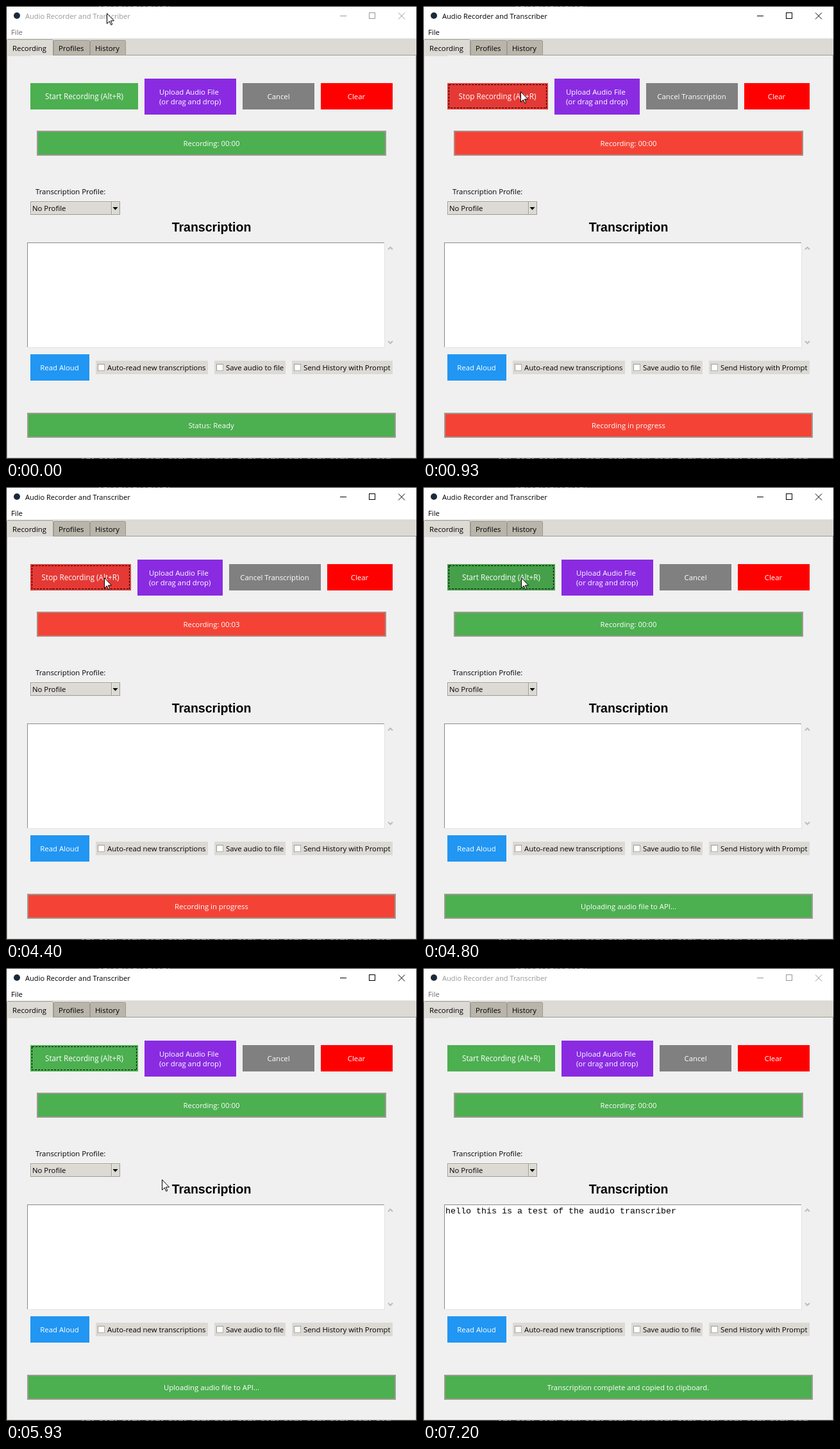
An HTML page that plays this animation: 641x705 px, repeating every 7.27 s.

```html
<!DOCTYPE html>
<html lang="en">
<head>
<meta charset="utf-8">
<title>Audio Recorder and Transcriber</title>
<style>
  html, body { margin: 0; width: 100%; height: 100%; overflow: hidden; background: #222; }
  svg { display: block; width: 641px; height: 705px; }
  rect, .crisp { shape-rendering: crispEdges; }
  text { font: 11.35px "Open Sans", "Noto Sans", sans-serif; }
  .title { font-size: 11.1px; }
  .wide { font-size: 11.7px; }
  .mid { text-anchor: middle; }
  .light text { fill: #fff; }
  .heading { font: bold 19.55px "Liberation Sans", Arial, sans-serif; }
  .mono { font: 13.333px "Liberation Mono", monospace; }

  .green { fill: #4caf50; }
  .red { fill: #f44336; }
  .violet { fill: #8a2be2; }
  .gray { fill: #808080; }
  .face { fill: #dcdad5; }
  .edge { fill: none; stroke: #9e9a91; }
  .ring { fill: none; stroke: #000; stroke-dasharray: 3 2; }
  .arrow { fill: none; stroke: #bcbcbc; stroke-width: 2; }

  /* One shared clock, hard changes */
  .a { animation: 7270ms step-end infinite; }
  .bar { animation-name: bar; }
  .menu { animation-name: menu; }
  .idle { animation-name: idle; }
  .rec { animation-name: rec; }
  .hover { animation-name: hover; }
  .focus { animation-name: focus; }
  .ready { animation-name: ready; }
  .upload { animation-name: upload; }
  .done { animation-name: done; }
  .s0 { animation-name: s0; }
  .s1 { animation-name: s1; }
  .s2 { animation-name: s2; }
  .s3 { animation-name: s3; }
  .cursor { animation-name: cursor; }

  @keyframes bar { 0%, 99.02% { color: #999; } 11% { color: #000; } }
  @keyframes menu { 0%, 99.02% { fill: #6d6d6d; } 11% { fill: #000; } }
  @keyframes idle { 0%, 66.01% { opacity: 1; } 12.78% { opacity: 0; } }
  @keyframes rec { 0%, 66.01% { opacity: 0; } 12.78% { opacity: 1; } }
  @keyframes hover { 0%, 12.78%, 67.8% { opacity: 0; } 11%, 66.01% { opacity: 1; } }
  @keyframes focus { 0%, 99.02% { opacity: 0; } 11% { opacity: 1; } }
  @keyframes ready { 0% { opacity: 1; } 12.78% { opacity: 0; } }
  @keyframes upload { 0%, 85.27% { opacity: 0; } 66.01% { opacity: 1; } }
  @keyframes done { 0% { opacity: 0; } 85.27% { opacity: 1; } }
  @keyframes s0 { 0% { opacity: 1; } 26.54% { opacity: 0; } }
  @keyframes s1 { 0%, 40.29% { opacity: 0; } 26.54% { opacity: 1; } }
  @keyframes s2 { 0%, 54.05% { opacity: 0; } 40.29% { opacity: 1; } }
  @keyframes s3 { 0% { opacity: 0; } 54.05% { opacity: 1; } }

  @keyframes cursor {
    /* title bar to the record button */
    0% { transform: translate(157px, 11px); opacity: 1; }
    .95% { transform: translate(122px, 27px); }
    1.78% { transform: translate(77px, 52px); }
    2.74% { transform: translate(62px, 85px); }
    3.7% { transform: translate(95px, 118px); }
    4.52% { transform: translate(150px, 128px); }
    5.49% { transform: translate(183px, 132px); }
    6.45% { transform: translate(152px, 133px); }
    /* small drifts on the button */
    16.49% { transform: translate(150px, 135px); }
    17.45% { transform: translate(148px, 137px); }
    57.76% { transform: translate(149px, 138px); }
    58.72% { transform: translate(151px, 140px); }
    59.54% { transform: translate(152px, 141px); }
    60.5% { transform: translate(153px, 141px); }
    /* away to the right, then back left */
    66.97% { transform: translate(160px, 148px); }
    67.8% { transform: translate(178px, 165px); }
    68.76% { transform: translate(205px, 195px); }
    69.72% { transform: translate(245px, 235px); }
    70.55% { transform: translate(290px, 272px); }
    71.51% { transform: translate(335px, 303px); }
    72.47% { transform: translate(375px, 324px); }
    73.3% { transform: translate(400px, 334px); }
    74.26% { transform: translate(412px, 338px); }
    75.23% { transform: translate(417px, 339px); }
    76.05% { transform: translate(408px, 336px); }
    77.02% { transform: translate(384px, 330px); }
    77.98% { transform: translate(345px, 325px); }
    78.8% { transform: translate(305px, 324px); }
    79.77% { transform: translate(270px, 326px); }
    80.73% { transform: translate(250px, 328px); }
    81.55% { transform: translate(243px, 329px); }
    /* out through the bottom */
    88.98% { transform: translate(236px, 355px); }
    89.81% { transform: translate(224px, 420px); }
    90.77% { transform: translate(235px, 500px); }
    91.73% { transform: translate(265px, 590px); }
    92.56% { transform: translate(310px, 675px); opacity: 1; }
    93.52%, 100% { transform: translate(310px, 705px); opacity: 0; }
  }
</style>
</head>
<body>
<svg viewBox="0 0 641 705">
  <defs>
    <g id="check">
      <rect width="11" height="11" fill="#fff"/>
      <rect x=".5" y=".5" width="10" height="10" fill="none" stroke="#b5b1a9"/>
      <path class="crisp edge" d="M.5 11V.5H11"/>
    </g>
    <path id="chevron" class="arrow" d="M-3.5 2L0-1.5 3.5 2"/>
  </defs>

  <!-- Desktop edge and window -->
  <rect width="641" height="705" fill="#222"/>
  <path class="crisp" d="M145 .5H260" stroke="#4c6672" stroke-dasharray="3 4 6 3 2 5"/>
  <path class="crisp" d="M118 704.5H600" stroke="#777" stroke-dasharray="4 3 7 2 3 9 5 3"/>
  <rect x="1" y="1" width="639" height="703" fill="#fff"/>

  <!-- Title bar and menu -->
  <circle cx="17" cy="15" r="5" fill="#1b2a3a"/>
  <g class="a bar" fill="none" stroke="currentColor">
    <text class="title" x="30" y="20" fill="currentColor" stroke="none">Audio Recorder and Transcriber</text>
    <path class="crisp" d="M521 15.5H531M566.5 10.5H575.5V19.5H566.5Z"/>
    <path d="M612 10.5L622 20.5M622 10.5L612 20.5"/>
  </g>
  <text class="a menu" x="8" y="45">File</text>

  <!-- Notebook -->
  <rect class="face" x="1" y="50" width="639" height="27"/>
  <path class="crisp" d="M1 50.5H640" stroke="#eeebe7"/>
  <rect x="1" y="77" width="639" height="627" fill="#f0f0f0"/>
  <rect class="edge" x="1.5" y="76.5" width="638" height="627"/>
  <g class="crisp" stroke="#9e9a91" fill="#bab5ab">
    <path d="M74.5 76.5V54.5L75.5 53.5H129.5L130.5 54.5V76.5Z"/>
    <path d="M131.5 76.5V54.5L132.5 53.5H185.5L186.5 54.5V76.5Z"/>
    <path d="M1.5 78V53.5L2.5 52.5H72.5L73.5 53.5V77" fill="#dcdad5"/>
  </g>
  <path class="crisp" d="M2.5 77V53.5H72" stroke="#eeebe7" fill="none"/>
  <text x="10" y="70">Recording</text>
  <text x="82" y="70">Profiles</text>
  <text x="139" y="70">History</text>

  <!-- Idle controls -->
  <g class="a idle light">
    <rect class="green" x="38" y="120" width="168" height="41"/>
    <rect class="a hover" x="38" y="120" width="168" height="41" fill="#45a049"/>
    <rect class="a focus ring" x="40.5" y="122.5" width="163" height="36"/>
    <text class="wide mid" x="122" y="145">Start Recording (Alt+R)</text>
    <rect class="violet" x="216" y="113" width="143" height="56"/>
    <text x="239" y="138">Upload Audio File</text>
    <text x="239" y="153">(or drag and drop)</text>
    <rect class="gray" x="369" y="120" width="112" height="41"/>
    <text class="mid" x="425" y="145">Cancel</text>
    <rect x="491" y="120" width="112" height="41" fill="#f00"/>
    <text class="mid" x="546.5" y="145">Clear</text>
    <rect class="green" x="48" y="194" width="545" height="39"/>
    <rect class="edge" x="49" y="195" width="543" height="37" stroke-width="2"/>
    <text class="mid" x="320.5" y="218">Recording: 00:00</text>
    <rect class="green" x="33" y="633" width="575" height="39"/>
  </g>

  <!-- Recording controls -->
  <g class="a rec light">
    <rect x="38" y="120" width="157" height="41" fill="#e53935"/>
    <rect class="ring" x="40.5" y="122.5" width="152" height="36"/>
    <text class="wide mid" x="116" y="145">Stop Recording (Alt+R)</text>
    <rect class="violet" x="205" y="113" width="133" height="56"/>
    <text x="223" y="138">Upload Audio File</text>
    <text x="223" y="153">(or drag and drop)</text>
    <rect class="gray" x="348" y="120" width="143" height="41"/>
    <text class="mid" x="419" y="145">Cancel Transcription</text>
    <rect x="501" y="120" width="102" height="41" fill="#f00"/>
    <text class="mid" x="551.5" y="145">Clear</text>
    <rect class="red" x="48" y="194" width="545" height="39"/>
    <rect x="49" y="195" width="543" height="37" fill="none" stroke="#b08a80" stroke-width="2"/>
    <text class="a s0 mid" x="320.5" y="218">Recording: 00:00</text>
    <text class="a s1 mid" x="320.5" y="218">Recording: 00:01</text>
    <text class="a s2 mid" x="320.5" y="218">Recording: 00:02</text>
    <text class="a s3 mid" x="320.5" y="218">Recording: 00:03</text>
    <rect class="red" x="33" y="633" width="575" height="39"/>
    <text class="mid" x="320.5" y="657">Recording in progress</text>
  </g>

  <!-- Status -->
  <rect class="edge" x="34" y="634" width="573" height="37" stroke-width="2"/>
  <g class="light mid">
    <text class="a ready" x="320" y="657">Status: Ready</text>
    <text class="a upload" x="320.5" y="657">Uploading audio file to API...</text>
    <text class="a done" x="320" y="657">Transcription complete and copied to clipboard.</text>
  </g>

  <!-- Profile picker -->
  <text x="46" y="293">Transcription Profile:</text>
  <rect class="face" x="38" y="304" width="140" height="21"/>
  <rect class="edge" x="38.5" y="304.5" width="139" height="20" rx="1"/>
  <path class="crisp" d="M39.5 324V305.5H163M165.5 324V305.5H177" fill="none" stroke="#eeebe7"/>
  <path class="crisp edge" d="M164.5 305V324"/>
  <path d="M166.5 313H174.5L170.5 317.5Z"/>
  <text x="41" y="319">No Profile</text>

  <!-- Transcript -->
  <text class="heading mid" x="320.5" y="351">Transcription</text>
  <rect x="33" y="368" width="558" height="164" fill="#fff"/>
  <path class="crisp" d="M33.5 531V368.5H590" fill="none" stroke="#8a8a8a"/>
  <path class="crisp" d="M34 531.5H590.5V369" fill="none" stroke="#e3e3e3"/>
  <use href="#chevron" x="599.5" y="377"/>
  <use href="#chevron" transform="translate(599.5 523.5) scale(1 -1)"/>
  <text class="a done mono" x="35" y="382">hello this is a test of the audio transcriber</text>

  <!-- Options -->
  <rect x="38" y="542" width="92" height="41" fill="#2196f3"/>
  <text class="mid" x="83.5" y="567" fill="#fff">Read Aloud</text>
  <rect class="face" x="140" y="552" width="175" height="21"/>
  <rect class="face" x="325" y="552" width="111" height="21"/>
  <rect class="face" x="446" y="552" width="157" height="21"/>
  <use href="#check" x="143" y="557"/>
  <use href="#check" x="328" y="557"/>
  <use href="#check" x="449" y="557"/>
  <text x="158" y="567">Auto-read new transcriptions</text>
  <text x="343" y="567">Save audio to file</text>
  <text x="464" y="567">Send History with Prompt</text>

  <path class="a cursor" d="M.5 .5V16.5L4.3 12.8 6.8 18.5 8.8 17.5 6.4 12H11.5Z" fill="#fff" stroke="#000"/>
</svg>
<style>
  .light.mid text { text-anchor: middle; }
</style>
</body>
</html>
```
